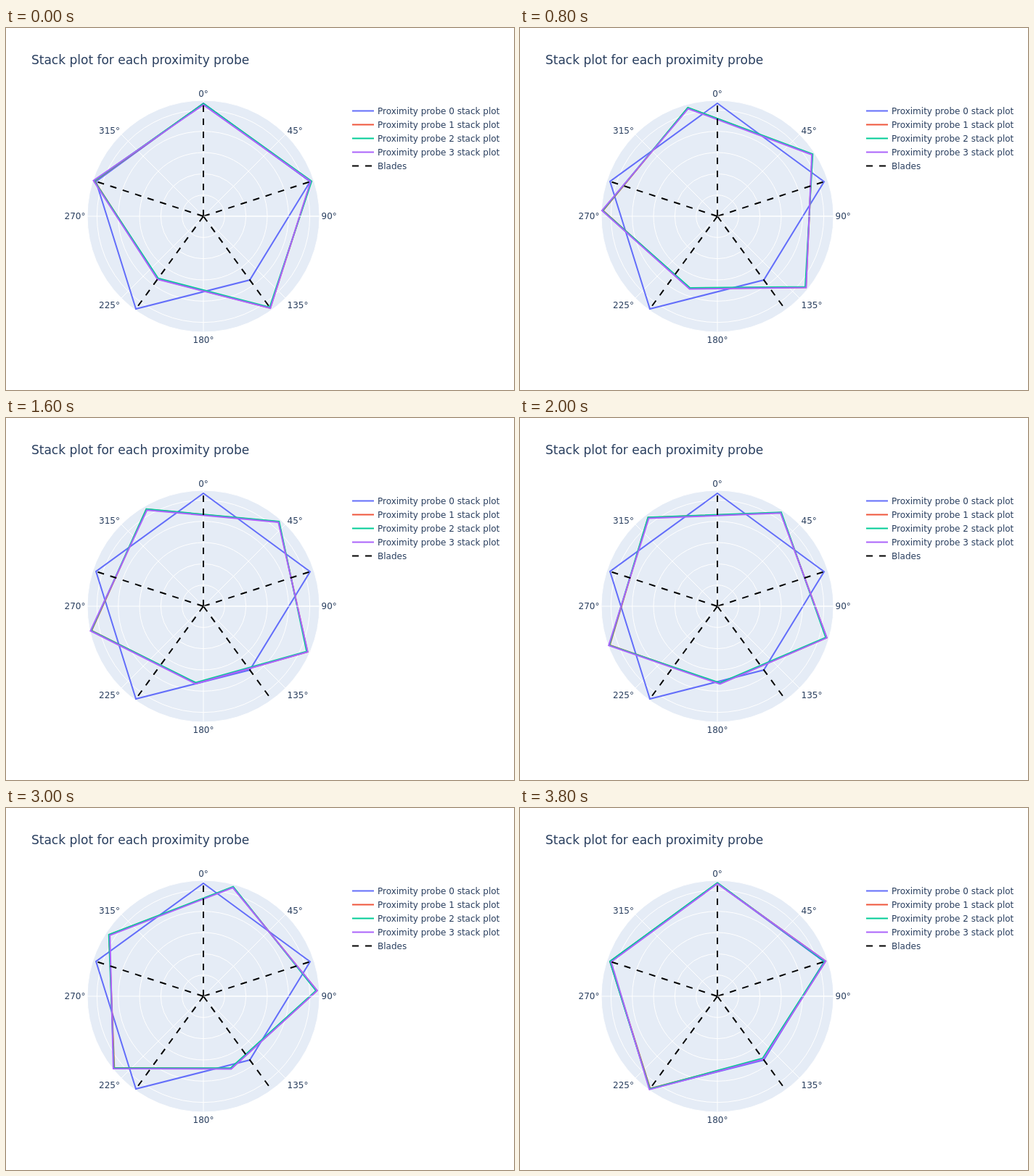
An HTML page for the animation above (4000 ms loop, 700 by 500 pixels).

```html
<!DOCTYPE html>
<html lang="en">
<head>
<meta charset="utf-8">
<title>Stack plot</title>
<style>
  html, body { margin: 0; width: 100%; height: 100%; overflow: hidden; background: #fff; }
  svg { display: block; }
  text { font: 12px "DejaVu Sans", Verdana, sans-serif; fill: #2a3f5f; white-space: pre; }
  .title { font-size: 17px; }
  .grid { fill: none; stroke: #fff; stroke-width: 1; }
  .trace { fill: none; stroke-width: 2; stroke-miterlimit: 2; }
  .blade { stroke: #000; stroke-dasharray: 9 9; }
</style>
</head>
<body>
<svg id="stage" width="700" height="500" viewBox="0 0 700 500"></svg>
<script>
const CX = 272, CY = 260, RADIUS = 160;
const STEPS = 20, STEP_MS = 200, BLADE_ANGLE = 72;
const svg = document.getElementById('stage');

// One radius per blade, clockwise from the top.
const probes = [
  { color: '#636efa', radii: [156, 154.6, 108.8, 158.2, 155.6], fixed: true },
  { color: '#EF553B', radii: [155.3, 156, 156.7, 107, 157.6] },
  { color: '#00cc96', radii: [155.6, 156.8, 155.4, 106, 158.3] },
  { color: '#ab63fa', radii: [153.9, 155.4, 157, 107.6, 159.3] }
];

function add(tag, attrs, text) {
  const node = document.createElementNS('http://www.w3.org/2000/svg', tag);
  for (const key in attrs) node.setAttribute(key, attrs[key]);
  if (text) node.textContent = text;
  return svg.appendChild(node);
}

function polar(radius, degrees) {
  const a = degrees * Math.PI / 180;
  return [CX + radius * Math.sin(a), CY - radius * Math.cos(a)];
}

function ray(radius, degrees, className) {
  const [x2, y2] = polar(radius, degrees);
  add('line', { x1: CX, y1: CY, x2, y2, class: className });
}

function label(x, y, text, anchor = 'start', className = '') {
  add('text', { x, y, 'text-anchor': anchor, class: className }, text);
}

add('circle', { cx: CX, cy: CY, r: RADIUS, fill: '#E5ECF6' });
for (let a = 0; a < 360; a += 45) ray(RADIUS, a, 'grid');
for (let i = 1; i <= 5; i++) add('circle', { cx: CX, cy: CY, r: i * 29.33, class: 'grid' });
add('circle', { cx: CX, cy: CY, r: RADIUS, class: 'grid' });

for (const probe of probes) {
  probe.node = add('polygon', { class: 'trace', stroke: probe.color });
}
for (let i = 0; i < 5; i++) ray(156, i * BLADE_ANGLE, 'trace blade');
ray(RADIUS, 90, 'grid');

[
  [272, 95, 'middle'], [387.5, 146, 'start'], [434.5, 264, 'start'], [387.5, 387, 'start'],
  [272, 435, 'middle'], [157, 387, 'end'], [109.5, 264, 'end'], [157, 146, 'end']
].forEach(([x, y, anchor], i) => label(x, y, i * 45 + '°', anchor));

label(35, 50, 'Stack plot for each proximity probe', 'start', 'title');

function legendRow(row, text, attrs) {
  const y = 114.5 + row * 19;
  add('line', { x1: 477, y1: y, x2: 507, y2: y, ...attrs });
  label(512, y + 4.5, text);
}
probes.forEach((probe, i) =>
  legendRow(i, `Proximity probe ${i} stack plot`, { class: 'trace', stroke: probe.color }));
legendRow(4, 'Blades', { class: 'trace blade' });

function draw(time) {
  const step = Math.floor(time / STEP_MS) % STEPS;
  const turn = -BLADE_ANGLE * step / (STEPS - 1);
  for (const { node, radii, fixed } of probes) {
    const points = radii.map((r, i) => polar(r, i * BLADE_ANGLE + (fixed ? 0 : turn)));
    node.setAttribute('points', points.join(' '));
  }
}

const start = performance.now();
function tick() {
  draw(performance.now() - start);
  requestAnimationFrame(tick);
}
tick();
</script>
</body>
</html>
```
